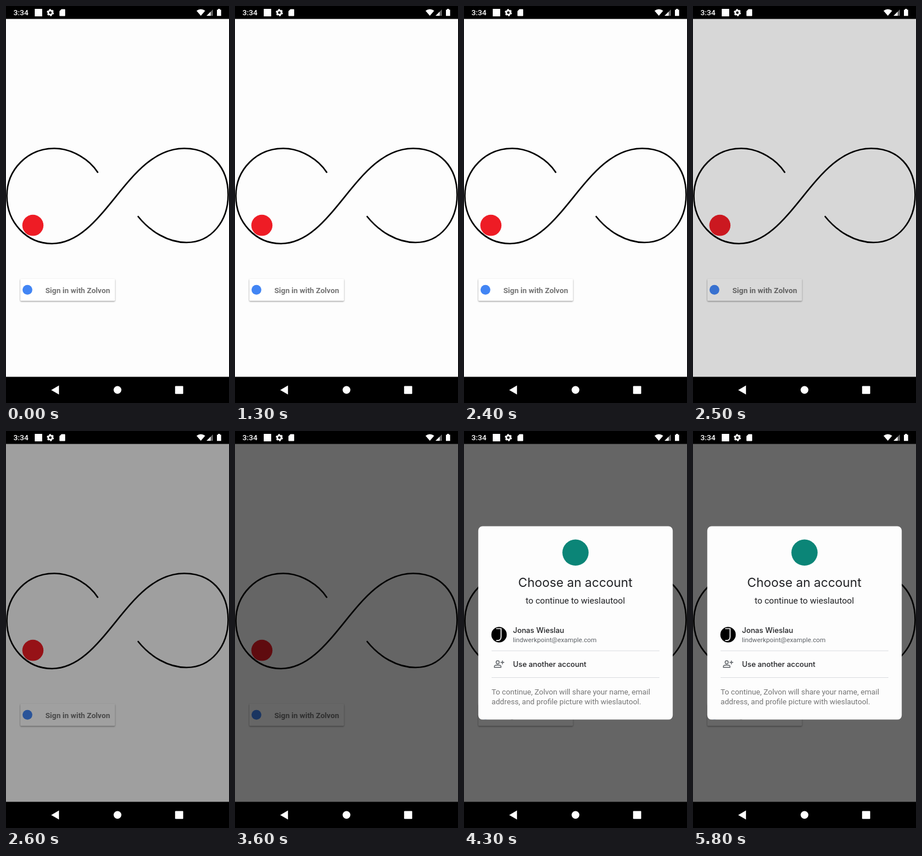
Recreate the animation shown at these times as an HTML page. Size 388 px wide and 690 px high, loop 5.9 s.

```html
<!DOCTYPE html>
<html lang="en">
<head>
<meta charset="utf-8">
<title>Sign-in dialog</title>
<style>
html, body { margin: 0; width: 100%; height: 100%; overflow: hidden; background: #000; }
svg { display: block; width: 388px; height: 690px; }
text { font-family: Roboto, sans-serif; }
.head { font-family: Inter, sans-serif; fill: #202124; }
.strong { font-size: 12.8px; font-weight: 500; }
.note { font-size: 13.2px; fill: #757575; }
.mid { text-anchor: middle; }
</style>
</head>
<body>
<svg viewBox="0 0 388 690">
  <defs>
    <filter id="lift" x="-10%" y="-20%" width="120%" height="150%">
      <feDropShadow dx="0" dy="1.2" stdDeviation=".8" flood-opacity=".5"/>
    </filter>
  </defs>

  <rect y="22" width="388" height="623" fill="#fdfdfd"/>
  <circle cx="46.8" cy="381.2" r="18.4" fill="#ee1c25"/>
  <path fill="none" stroke="#000" stroke-width="2.6" stroke-linecap="round"
    d="M159.5 289C146 268 116 247.5 84 247.5C38 247.5 1.5 284 1.5 330C1.5 376 36 413 80 413C172 413 210 247.5 310 247.5C357 247.5 386.5 280 386.5 328C386.5 374 357 411 314 411C282 411 251 392 230 366"/>

  <rect id="button" x="25" y="474" width="164.5" height="38.3" rx="1.5" filter="url(#lift)"/>
  <circle cx="37.3" cy="493.3" r="8.5" fill="#4285f4"/>
  <text x="68.5" y="498.5" font-size="13.2" font-weight="700" fill="#737373">Sign in with Zolvon</text>

  <rect id="dim" y="22" width="388" height="623"/>

  <g id="dialog">
    <rect x="24.8" y="165.6" width="338.4" height="336" rx="7.5" fill="#fdfdfd"/>
    <circle cx="194" cy="211.3" r="22.8" fill="#0b8577"/>
    <text class="head mid" x="193.7" y="271" font-size="21.7">Choose an account</text>
    <text class="mid" x="193.7" y="300.3" font-size="15.1" fill="#202124">to continue to wieslautool</text>

    <circle cx="61" cy="354" r="13.4"/>
    <path d="M56 343.5H64.5V358Q64.5 365 56 364" fill="none" stroke="#fff" stroke-width="1.7"/>
    <text class="head strong" x="85.3" y="351">Jonas Wieslau</text>
    <text x="85" y="367" font-size="11.3" fill="#5f6368">lindwerkpoint@example.com</text>

    <g fill="none" stroke="#5f6368" stroke-width="1.4">
      <circle cx="58.6" cy="402" r="2.7"/>
      <path d="M52.8 410.8V409.2C52.8 405.9 64.4 405.9 64.4 409.2V410.8ZM66.8 399V405.4M63.6 402.2H70"/>
    </g>
    <text class="head strong" x="85.3" y="409.7">Use another account</text>
    <path d="M48 382H340M48 428.5H340" stroke="#dadce0"/>

    <text class="note" x="48" y="458">To continue, Zolvon will share your name, email</text>
    <text class="note" x="48" y="475.3">address, and profile picture with wieslautool.</text>
  </g>

  <!-- system bars -->
  <path d="M0 0H388V22.6H0ZM0 644.5H388V690H0Z"/>
  <g fill="#fff">
    <text x="13" y="16" font-size="13.2" font-weight="500">3:34</text>
    <rect x="50" y="5" width="13" height="13"/>
    <path d="M96.5 5.5H102Q103 5.5 103 6.5V16.5Q103 17.5 102 17.5H94Q93 17.5 93 16.5V9Z"/>
    <path d="M331.5 8.2Q339 2.6 346.5 8.2L339 17Z"/>
    <path d="M360 6V17H349Z" fill="#666"/>
    <path d="M356 10V17H349Z"/>
    <path d="M367 6.5H369V5H372.3V6.5H374.3V17.3H367Z"/>
    <path d="M92.2 659.6V675.2L78.6 667.4Z"/>
    <circle cx="194" cy="667.3" r="6.7"/>
    <rect x="294.2" y="660.4" width="14.1" height="13.9" rx="1"/>
  </g>
  <g fill="none" stroke="#fff">
    <circle cx="77.2" cy="11.5" r="3.6" stroke-width="2.8"/>
    <circle cx="77.2" cy="11.5" r="5.3" stroke-width="1.8" stroke-dasharray="2.9 2.65"/>
  </g>
</svg>
<script>
const LOOP = 5900, STEP = 100;
const el = id => document.getElementById(id);
const button = el('button'), dim = el('dim'), dialog = el('dialog');
const ramp = (t, start, length) => Math.min(1, Math.max(0, (t - start) / length));

function draw(now) {
  const t = Math.floor(now % LOOP / STEP) * STEP;
  const press = ramp(t, 1700, 100) - ramp(t, 1900, 200);
  const shade = 255 - 17 * press;
  button.setAttribute('fill', `rgb(${shade},${shade},${shade})`);
  dim.setAttribute('opacity', 0.6 * ramp(t, 2435, 265));
  dialog.setAttribute('opacity', ramp(t, 3600, 270));
}

const start = performance.now();
function tick() {
  draw(performance.now() - start);
  requestAnimationFrame(tick);
}
tick();
</script>
</body>
</html>
```
